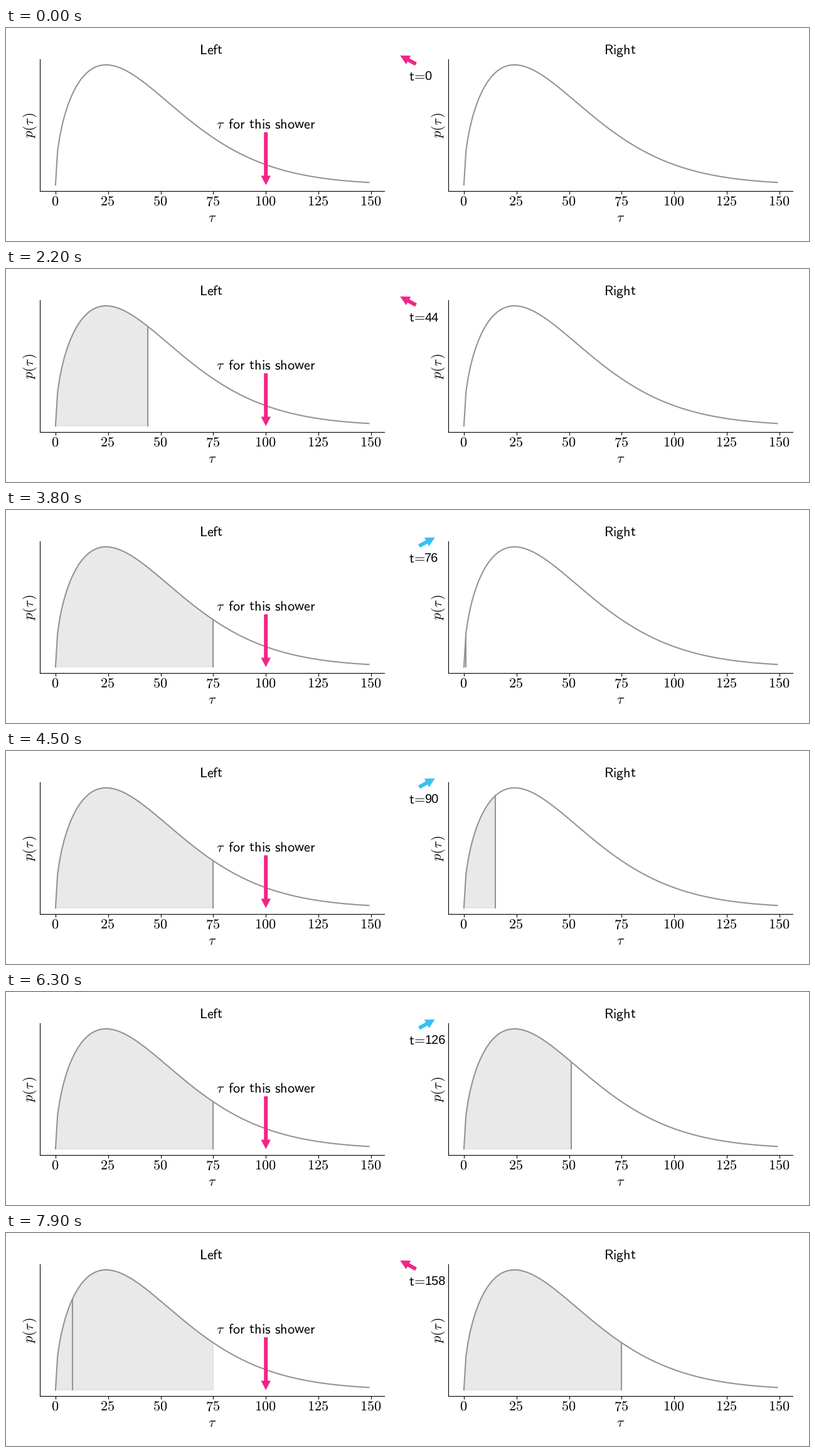
Animation, 1280 px wide and 341 px high, one loop 8000 ms. Source, as a matplotlib script:

```python
import numpy as np
import matplotlib.pyplot as plt
from matplotlib.animation import FuncAnimation

plt.rcParams["mathtext.fontset"] = "cm"
plt.rcParams["text.hinting"] = "none"

WIDTH, HEIGHT, DPI = 1280, 341, 100
FRAMES, INTERVAL = 80, 100
STEP, SWITCH = 2, 75            # time per frame, time spent on each side
GREY, PINK, BLUE = "#929591", "#f22585", "#3abff2"

LEFT_ZERO, RIGHT_ZERO = 78.9, 729.9
BASE, PEAK, UNIT = 251.2, 59.0, 3.353
AXIS_Y, AXIS_TOP, MARGIN = 261.0, 49.6, 7.45
SCALE, SHAPE = 50, 1.5
TAU = r"\tau\hspace{0.13}"      # with italic correction

fig = plt.figure(figsize=(WIDTH / DPI, HEIGHT / DPI), dpi=DPI, facecolor="white")
ax = fig.add_axes([0, 0, 1, 1])
ax.set_xlim(0, WIDTH)
ax.set_ylim(HEIGHT, 0)
ax.axis("off")


def weibull(tau):
    return tau ** (SHAPE - 1) * np.exp(-(tau / SCALE) ** SHAPE)


TAUS = np.arange(150)
DENSITY = weibull(TAUS)
HEIGHTS = BASE - (BASE - PEAK) * DENSITY / DENSITY.max()


def label(x, y, text, ha="center", size=16, **kwargs):
    return ax.text(x, y, text, fontsize=size, ha=ha, va="baseline",
                   color="black", zorder=5, **kwargs)


def sans(text):
    # \hspace keeps normal text spacing inside math mode
    text = text.replace("=", r"\hspace{-0.2}=\hspace{-0.2}")
    return r"\mathsf{" + text.replace(" ", r"\hspace{0.38}") + "}"


def arrow(tail, tip, color, width=6, head=15.6, length=15):
    tail, tip = np.array(tail, float), np.array(tip, float)
    along = (tip - tail) / np.hypot(*(tip - tail))
    across = np.array([-along[1], along[0]])
    neck = tip - along * length
    points = [tail + across * width / 2, neck + across * width / 2,
              neck + across * head / 2, tip, neck - across * head / 2,
              neck - across * width / 2, tail - across * width / 2]
    return ax.fill(*np.transpose(points), color=color, lw=0, zorder=4)[0]


class Panel:
    def __init__(self, zero, title):
        self.xs = zero + TAUS * UNIT
        start = zero - MARGIN * UNIT
        end = self.xs[-1] + MARGIN * UNIT
        middle = (start + end) / 2
        axis = dict(color="black", lw=0.8, zorder=3)
        ax.plot([start, start], [AXIS_TOP, AXIS_Y], **axis)
        ax.plot([start, end], [AXIS_Y, AXIS_Y], **axis)
        for tick in range(0, 151, 25):
            x = zero + tick * UNIT
            ax.plot([x, x], [AXIS_Y, AXIS_Y + 4.9],
                    solid_capstyle="butt", **axis)
            label(x - 1.1, 284.4, rf"$\mathrm{{{tick}}}$")
        label(middle, 310, r"$\tau$")
        label(start - 9.6, 155, f"$p({TAU})$", rotation=90,
              rotation_mode="anchor")
        label(middle - 1.4, 41.5, f"${sans(title)}$")

        ax.plot(self.xs, HEIGHTS, color=GREY, lw=1.5, zorder=2)
        self.area = ax.fill([0, 0, 0], [0, 0, 0], color=GREY, alpha=0.2,
                            lw=1, zorder=1)[0]
        self.marker, = ax.plot([], [], color=GREY, lw=1.5, zorder=2)

    def show(self, covered, tau):
        self.area.set_visible(covered > 0)
        if covered > 0:
            xs, ys = self.xs[:covered + 1], HEIGHTS[:covered + 1]
            outline = np.column_stack([xs, ys])
            self.area.set_xy(np.vstack([outline, [xs[-1], BASE], [xs[0], BASE]]))
        if tau > 0:
            self.marker.set_data([self.xs[tau]] * 2, [BASE, HEIGHTS[tau]])
        else:
            self.marker.set_data([], [])


left = Panel(LEFT_ZERO, "Left")
right = Panel(RIGHT_ZERO, "Right")

shower_x = LEFT_ZERO + 100 * UNIT
label(shower_x, 160.5, f"${TAU}{sans(' for this shower')}$")
arrow((shower_x, 167), (shower_x, 251.5), PINK)

look_left = arrow((653.5, 57.7), (628.3, 44), PINK)
look_right = arrow((658.5, 57.7), (683.7, 44), BLUE)
label(642, 84, f"${sans('t=')}$", ha="left")
clock = label(667.3, 84, "0", ha="left", size=14.4, family="Liberation Sans")


def update(frame):
    t = frame * STEP
    visit, elapsed = divmod(t, SWITCH)
    on_left = visit % 2 == 0

    left_tau = elapsed if on_left else SWITCH
    right_tau = SWITCH if visit >= 2 else elapsed * visit
    left.show(min(t, SWITCH), left_tau)
    right.show(right_tau, right_tau)

    look_left.set_visible(on_left)
    look_right.set_visible(not on_left)
    clock.set_text(str(t))
    return []


anim = FuncAnimation(fig, update, frames=FRAMES, interval=INTERVAL,
                     repeat=True, repeat_delay=0, blit=False)
plt.show()
```
